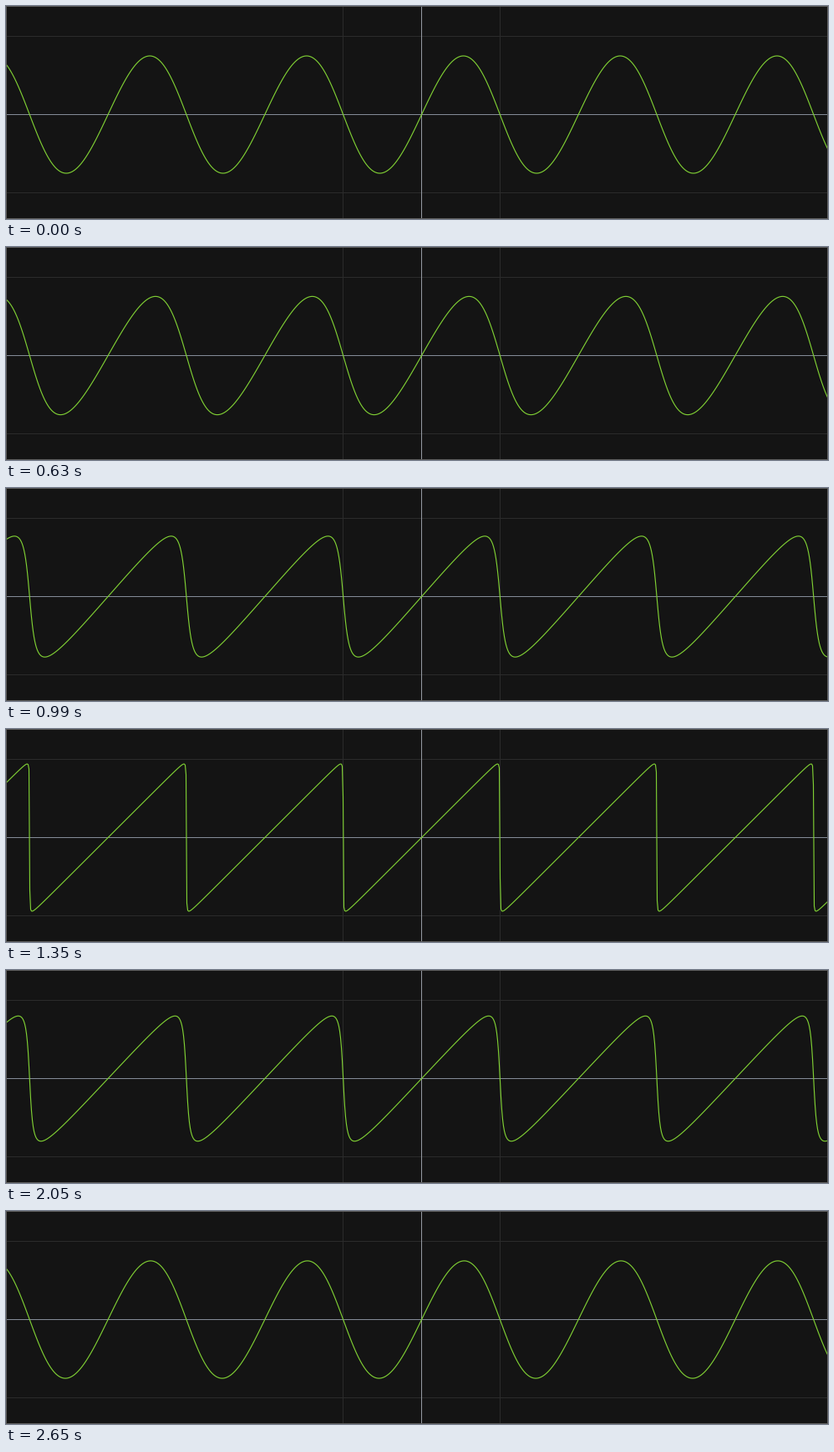
Recreate the animation shown at these times as a matplotlib script. Size 984 by 256 pixels, loop 2.75 s.

```python
import numpy as np
import matplotlib.pyplot as plt
from matplotlib.animation import FuncAnimation
from matplotlib.patches import Rectangle

W, H, DPI = 984, 256, 100
PX = 72 / DPI                # one pixel in points
CX, CY, UNIT = 497.5, 130.5, 93.85
LOOP, TICK = 2750, 10

# Moments (ms) at which the picture changes; each pose holds until the next.
STARTS = np.r_[0:1711:90, 1800, 1890, 1970, 2050, 2130, 2200, 2290:2651:90]

plt.rcParams["path.simplify"] = False
fig = plt.figure(figsize=(W / DPI, H / DPI), dpi=DPI, facecolor="#141414")
ax = fig.add_axes([0, 0, 1, 1])
ax.set_xlim(0, W)
ax.set_ylim(H, 0)
ax.axis("off")


def bar(x, y, w, h, color, z):
    ax.add_patch(Rectangle((x, y), w, h, facecolor=color, linewidth=0,
                           antialiased=False, zorder=z))


def vline(x, color, z=1):
    bar(x, 0, 1, H, color, z)


def hline(y, color, z=1):
    bar(0, y, W, 1, color, z)


for side in (-1, 1):
    vline(int(CX + side * UNIT), "#2b2b2b")
    hline(int(CY + side * UNIT), "#2b2b2b")
hline(int(CY), "#858c98", 2)
vline(int(CX), "#959aa2", 2)

for x in (0, W - 1):
    vline(x, "#5c5c5c", 5)
for y in (0, H - 1):
    hline(y, "#5c5c5c", 5)

xs = np.arange(0, W + 1) + 0.5
theta = np.pi * (xs - CX) / UNIT
curve, = ax.plot(xs, np.full_like(xs, CY), color="#80d034",
                 linewidth=1.15 * PX, solid_joinstyle="round", zorder=3)


def wave(skew):
    """Sine at skew 0, leaning over into a sawtooth at skew 1."""
    a = np.sin(np.pi / 2 * skew)
    s = a ** 1.75
    blend = s * s * (3 - 2 * s)
    gain = (0.75 + (2 / np.pi - 0.75) * blend) / a
    return gain * np.arctan2(a * np.sin(theta), 1 + a * np.cos(theta))


def draw(i):
    t = STARTS[np.searchsorted(STARTS, i * TICK, side="right") - 1]
    skew = (1 - np.cos(0.00234 * t - 0.519)) / 2
    curve.set_ydata(CY - UNIT * wave(max(skew, 1e-4)))
    return curve,


anim = FuncAnimation(fig, draw, frames=LOOP // TICK, interval=TICK,
                     repeat=True, repeat_delay=0, blit=False)
plt.show()
```
